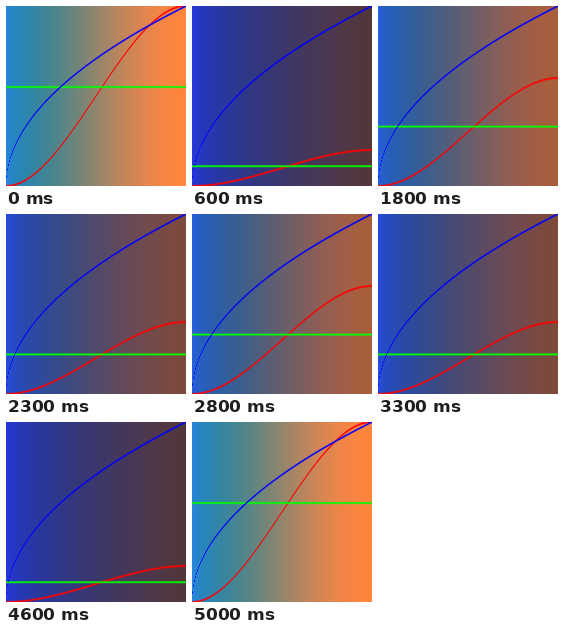
Write a matplotlib script that moves like this. It is 180 px wide and 180 px high and loops after 5100 ms.

```python
import numpy as np
import matplotlib.pyplot as plt
from matplotlib.animation import FuncAnimation

SIZE = 180
FRAMES = 51
INTERVAL = 100
LINE = 0.01  # half width of a plotted curve

LEFT = np.array([0.149, 0.141, 0.912])
RIGHT = np.array([1.000, 0.833, 0.224])

# Pixel centres in the unit square, y pointing up
axis = (np.arange(SIZE) + 0.5) / SIZE
x, y = np.meshgrid(axis, axis)


def smoothstep(lo, hi, v):
    t = np.clip((v - lo) / (hi - lo), 0, 1)
    return t * t * (3 - 2 * t)


def mix(a, b, t):
    return a + (b - a) * t


def curve_mask(level):
    return smoothstep(level - LINE, level, y) - smoothstep(level, level + LINE, y)


def shade(seconds):
    """Blend each channel by its own curve, then draw the curves on top."""
    wave = abs(1 - 2 * (seconds % 1))
    levels = np.stack([
        smoothstep(0, 1, x) * wave,
        np.full_like(x, 0.55 * wave),
        np.sqrt(x),
    ], axis=-1)
    rgb = mix(LEFT, RIGHT, levels)
    for channel, pure in enumerate(np.eye(3)):
        mask = curve_mask(levels[..., channel])
        rgb = mix(rgb, pure, mask[..., None])
    return np.clip(rgb, 0, 1)


fig = plt.figure(figsize=(SIZE / 100, SIZE / 100), dpi=100)
ax = fig.add_axes([0, 0, 1, 1])
ax.axis("off")
picture = ax.imshow(shade(0), origin="lower", interpolation="nearest", aspect="auto")


def update(i):
    picture.set_data(shade(i / 10))
    return [picture]


anim = FuncAnimation(fig, update, frames=FRAMES, interval=INTERVAL,
                     repeat=True, repeat_delay=0, blit=False)
plt.show()
```
